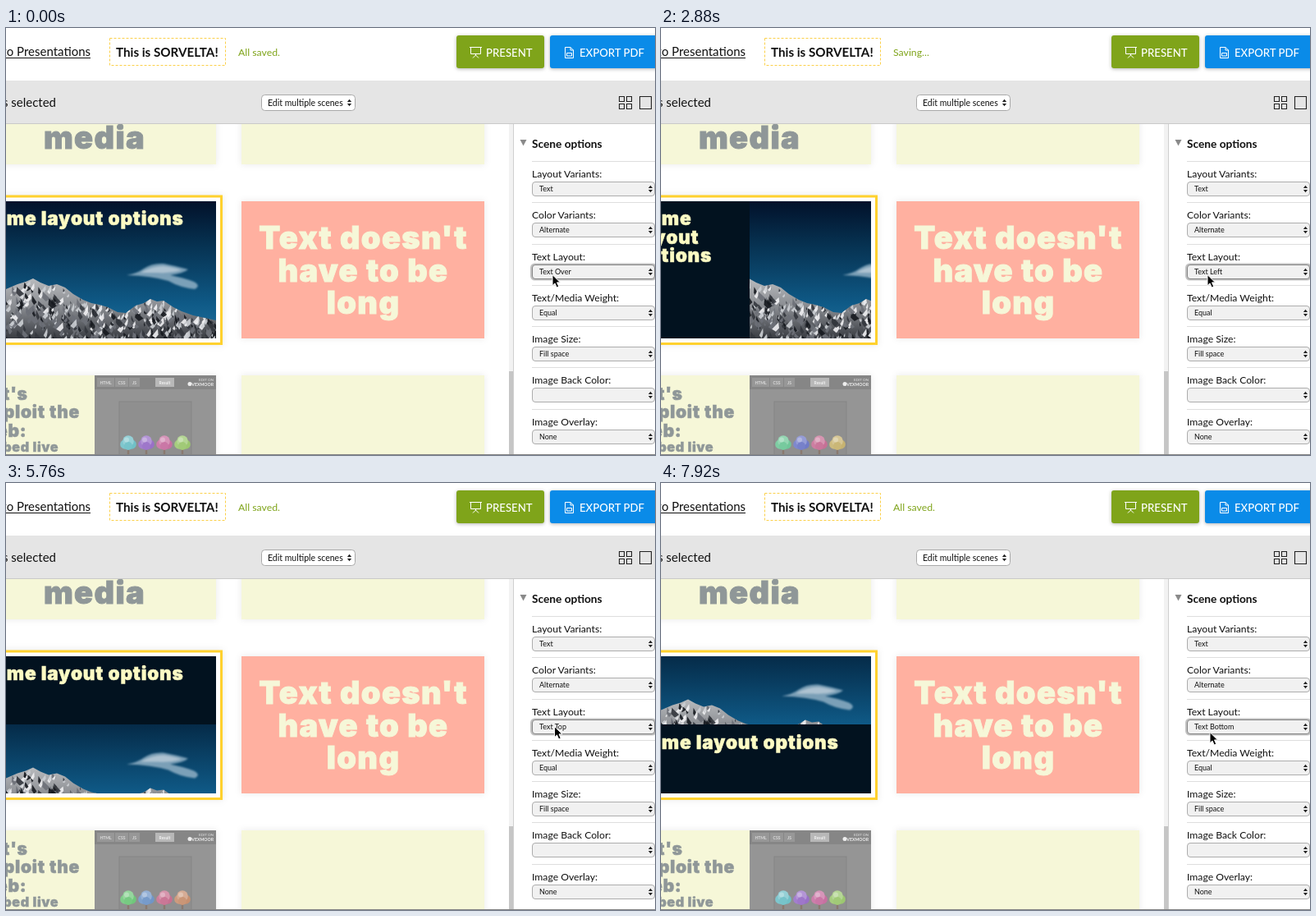
An HTML page for the animation above (8 s loop, 791 by 520 pixels).

```html
<!DOCTYPE html>
<html lang="en">
<head>
<meta charset="utf-8">
<title>Slide editor</title>
<style>
html, body { margin: 0; width: 100%; height: 100%; overflow: hidden; background: #fff; }
svg { display: block; width: 791px; height: 520px; }
text { font-family: Lato, "Open Sans", sans-serif; white-space: pre; }
.head { font-family: Inter, "Open Sans", sans-serif; font-weight: 900; letter-spacing: .036em; stroke-width: .024em; }
.menu text { font-family: Inter, Roboto, sans-serif; }
.card { filter: drop-shadow(0 0 4px rgba(0, 0, 0, .09)); }
.btn { filter: drop-shadow(0 1px 2px rgba(0, 0, 0, .3)); }
.menu rect.box { filter: drop-shadow(0 3px 5px rgba(0, 0, 0, .4)); }
</style>
</head>
<body>
<svg id="stage" viewBox="0 0 791 520">
  <defs>
    <linearGradient id="sky" x1="0" y1="0" x2="0" y2="1">
      <stop offset="0" stop-color="#02112a"/>
      <stop offset=".3" stop-color="#06304f"/>
      <stop offset=".75" stop-color="#0f5a87"/>
      <stop offset="1" stop-color="#22709c"/>
    </linearGradient>
    <linearGradient id="rock" gradientUnits="userSpaceOnUse" x1="0" y1="305" x2="0" y2="378">
      <stop offset="0" stop-color="#b9bbbe"/>
      <stop offset=".5" stop-color="#85888d"/>
      <stop offset="1" stop-color="#393c42"/>
    </linearGradient>
    <filter id="soft"><feGaussianBlur stdDeviation="1.3"/></filter>
    <clipPath id="crop"><rect id="cropBox"/></clipPath>
    <clipPath id="massif"><path id="massifShape"/></clipPath>
  </defs>
</svg>
<script>
const stage = document.getElementById('stage');
const $ = id => document.getElementById(id);
const LOOP = 8000;

const rect = (x, y, w, h, fill, more = '') =>
  `<rect x="${x}" y="${y}" width="${w}" height="${h}" fill="${fill}" ${more}/>`;
const text = (s, x, y, size, fill = '#111', more = '') =>
  `<text x="${x}" y="${y}" font-size="${size}" fill="${fill}" ${more}>${s}</text>`;
const head = (s, x, y, size, fill, more = '') =>
  text(s, x, y, size, fill, `class="head" stroke="${fill}" ${more}`);
const path = (d, fill, more = '') => `<path d="${d}" fill="${fill}" ${more}/>`;
const arrows = (x, y) => path(`M${x - 2.6} ${y - 1}h5.2l-2.6-3.2zM${x - 2.6} ${y + 1}h5.2l-2.6 3.2z`, '#222');

const CREAM = '#f6f7d8', GREY = '#8f9798', GREEN = '#7fa41a', NAVY = '#02121f', PALE = '#fdfbc4';
const MID = 'text-anchor="middle"', END = 'text-anchor="end"', BOLD = 'font-weight="700"';

function random(seed) {
  return () => (seed = seed * 16807 % 2147483647) / 2147483647;
}

// Mountain picture, drawn where it fills the whole slide
const RIDGE = [[-40, 335], [-15, 326], [0, 318], [14, 312], [24, 309], [33, 305], [42, 310], [52, 314],
  [62, 312], [72, 316], [82, 324], [94, 331], [104, 335], [114, 337], [124, 340], [136, 346], [146, 347],
  [158, 338], [168, 335], [176, 330], [184, 333], [192, 332], [204, 340], [214, 345], [228, 350], [256, 356]];
const MASSIF = 'M' + RIDGE.join('L') + 'V378H-40z';

function ridgeAt(x) {
  const i = Math.max(1, RIDGE.findIndex(p => p[0] >= x));
  const [x0, y0] = RIDGE[i - 1], [x1, y1] = RIDGE[i];
  return y0 + (y1 - y0) * (x - x0) / (x1 - x0);
}

// Snow lies on the left faces, shadow on the right ones
function mountains() {
  const rnd = random(77), tones = ['#f1f1f3', '#cdd0d4', '#6d7178', '#33373e', '#16191f'];
  let facets = '';
  for (let i = 0; i < 520; i++) {
    const x = -40 + rnd() * 296, top = ridgeAt(x), depth = rnd();
    const y = top - 2 + depth * (378 - top), s = 2 + rnd() * 5;
    const shade = rnd() < .36 + depth * .3, dx = (shade ? 1 : -1) * s * (.5 + rnd());
    const tone = tones[shade ? 2 + Math.floor(rnd() * 3) : Math.floor(rnd() * 2 + depth * .9)];
    facets += path(`M${x} ${y}l${dx} ${s * 1.3}l${-dx * .6} ${s * .5}l${-dx * .5} ${-s * .7}z`, tone, 'opacity=".9"');
  }
  return path(MASSIF, 'url(#rock)') + `<g clip-path="url(#massif)">${facets}</g>`;
}

const picture = rect(-40, 211, 296, 167, 'url(#sky)') +
  `<g filter="url(#soft)">` +
  path('M147 301Q160 299 168 293Q178 286 192 287Q208 290 222 294Q216 299 200 301Q216 304 229 309Q238 314 230 318Q212 316 198 308Q178 302 147 301z', '#8fafc5', 'opacity=".85"') +
  path('M164 298Q178 290 192 290Q206 292 214 295Q200 299 186 298z', '#c3d2dc', 'opacity=".7"') +
  `</g>` + mountains();

function slides() {
  const card = (x, y, w, h, fill) => rect(x, y, w, h, fill, 'class="card"');
  const line = (s, y) => head(s, 435.5, y, 38, CREAM, MID);
  const label = (s, x, w) => rect(x, 426, w, 11, '#979797') +
    text(s, x + w / 2, 433.5, 5, '#dcdcdc', MID + ' ' + BOLD);
  return card(-40, 60, 296, 106, CREAM) + card(287, 60, 296, 106, CREAM) +
    head('media', 108, 147, 38, GREY, MID) +
    rect(-48, 205, 310.5, 179.5, '#fff', 'stroke="#ffd12e" stroke-width="3" class="card"') +
    rect(-40, 211, 296, 167, NAVY) +
    `<g clip-path="url(#crop)"><g id="photo">${picture}</g></g><g id="caption"></g>` +
    card(287, 211, 296, 167, '#ffb0a0') +
    line("Text doesn't", 269) + line('have to be', 309) + line('long', 348) +
    card(-40, 423, 296, 120, CREAM) + card(287, 423, 296, 120, CREAM) +
    head("Let's", -30, 453, 21, GREY) + head('exploit the', -30, 475, 21, GREY) +
    head('web:', -30, 498, 21, GREY) + head('embed live', -30, 516, 16.2, GREY) +
    rect(108, 423, 148, 97, '#959595') + rect(108, 423, 148, 17, '#868686') +
    rect(138, 455, 88, 65, '#8f8f8f', 'stroke="#858585"') +
    label('HTML', 111, 21) + label('CSS', 133, 16) + label('JS', 150, 13) +
    rect(182, 426, 23, 11, '#b8b8b8') + text('Result', 193.5, 433.5, 5, '#f2f2f2', MID + ' ' + BOLD) +
    text('EDIT ON', 253, 430, 4.5, '#e4e4e4', END) +
    '<circle cx="224" cy="433.5" r="2.5" fill="#eee"/>' +
    text('VEXMOOR', 253, 436, 5.2, '#eee', END + ' ' + BOLD) +
    '<g id="trees"></g>' +
    rect(613, 117, 5, 403, '#f2f2f2') + rect(613, 418, 5, 102, '#c6c6c6');
}

function header() {
  const icon = d => path(d, 'none', 'stroke="#fff" stroke-width="1"');
  return rect(0, 0, 791, 64, '#fff') + rect(0, 64, 791, 52, '#e5e5e5') + rect(0, 116, 791, 1, '#c9c9c9') +
    text('Go to Presentations', 103, 34, 15, '#111', END) + rect(0, 36, 103, 1, '#111') +
    rect(126.5, 12.5, 141, 33, '#fff', 'stroke="#fbd04a" stroke-dasharray="3 2"') +
    text('This is SORVELTA!', 134, 34.5, 15.2, '#111', BOLD) +
    text('', 283, 34, 12.3, GREEN, 'id="status"') +
    rect(549, 9, 107, 40, GREEN, 'rx="3" class="btn"') + rect(663, 9, 140, 40, '#0a8be8', 'rx="3" class="btn"') +
    icon('M565 23.5h15M566.5 23.5v8h12v-8M572.5 31.5v2M569 36.5l3.5-3.5l3.5 3.5') +
    icon('M681.5 23.5h6.5l3.5 3.5v9.5h-10zM688 23.5v3.5h3.5M683.5 30.5h6v3.5h-6z') +
    text('PRESENT', 585, 35, 13.2, '#fff', 'font-weight="500"') +
    text('EXPORT PDF', 699, 35, 13.2, '#fff', 'font-weight="500"') +
    text('1 scenes selected', 61, 96, 15, '#111', END) +
    rect(311.5, 81.5, 114, 19, '#fff', 'rx="4" stroke="#a9a9a9"') +
    text('Edit multiple scenes', 319, 95, 10.5) + arrows(418.5, 91) +
    path('M747.5 83.5h6v6h-6zM756.5 83.5h6v6h-6zM747.5 92.5h6v6h-6zM756.5 92.5h6v6h-6zM772.5 83.5h14v15h-14z',
      'none', 'stroke="#222" stroke-width="1.1"');
}

function panel() {
  const fields = [['Layout Variants:', 'Text'], ['Color Variants:', 'Alternate'], ['Text Layout:', ''],
    ['Text/Media Weight:', 'Equal'], ['Image Size:', 'Fill space'], ['Image Back Color:', ''], ['Image Overlay:', 'None']];
  const rows = fields.map(([name, value], i) => {
    const y = Math.round(196 + 50.25 * i), focus = i === 2;
    return rect(641, y - 34, 150, 1, '#dedede') + text(name, 641, y - 14, 12.2) +
      (focus ? rect(640.5, y - 9, 151, 18, 'none', 'rx="4" stroke="#9a9a9a" stroke-width="3" opacity=".6"') : '') +
      rect(641.5, y - 8.5, 149, 17, '#f1f1f1', `rx="3.5" stroke="${focus ? '#858585' : '#adadad'}"`) +
      text(value, 650, y + 3.2, 9, '#111', focus ? 'id="choice"' : '') + arrows(785.5, y);
  });
  return rect(618, 117, 173, 403, '#fff') + rect(618, 117, 1, 403, '#cfcfcf') +
    path('M626.5 136h8l-4 7.5z', '#8a8a8a') + text('Scene options', 641, 145.5, 13.7, '#111', BOLD) + rows.join('');
}

stage.innerHTML += slides() + header() + panel() + rect(0, 519, 791, 1, '#858585') +
  '<g id="menu" class="menu"></g>' +
  `<g id="cursor">${path('M0 0V13.2L3 10.4L5.2 15.4L7.7 14.3L5.5 9.4H9.5z', '#000', 'stroke="#fff" stroke-width="1"')}</g>`;
$('massifShape').setAttribute('d', MASSIF);

const NAMES = ['Text Over', 'Text Left', 'Text Right', 'Text Top', 'Text Bottom'];
// Visible part of the picture, its shift, and the caption's place
const LAYOUTS = [
  { box: [-40, 211, 296, 167], shift: [0, 0], at: [-30, 240] },
  { box: [108, 211, 148, 167], shift: [74, 0], at: [-30, 240], narrow: true },
  { box: [-40, 211, 148, 167], shift: [-74, 0], at: [118, 240], narrow: true },
  { box: [-40, 294, 296, 84], shift: [0, 41.5], at: [-30, 240] },
  { box: [-40, 211, 296, 83], shift: [0, -41.5], at: [-30, 323.5] }
];
const PICKS = [1240, 2960, 4740, 6900];
const MENUS = [[480, 1000], [2100, 2720], [3700, 4500], [6100, 6660]];
const SAVED = 'All saved.', WAIT = 'Waiting for saving...', SAVE = 'Saving...';
const STATUS = [[0, SAVED], [1320, WAIT], [2720, SAVE], [3040, WAIT], [4400, SAVE], [5000, SAVED],
  [5840, WAIT], [6400, SAVE], [6960, WAIT], [7360, SAVE], [7760, SAVED]];
const PATH = [[0, 666, 300.5], [5000, 666, 300.5], [5400, 668.5, 296.5], [6000, 668.5, 296.5],
  [6200, 669, 303.5], [LOOP, 669, 303.5]];

const ease = u => u * u * (3 - 2 * u);

function showLayout(k) {
  const { box, shift, at: [x, y], narrow } = LAYOUTS[k];
  ['x', 'y', 'width', 'height'].forEach((name, i) => $('cropBox').setAttribute(name, box[i]));
  $('photo').setAttribute('transform', `translate(${shift})`);
  const lines = narrow ? ['Some', 'layout', 'options'] : ['Some layout options'];
  $('caption').innerHTML = lines.map((s, i) => head(s, x, y + i * 22.7, 22.6, PALE)).join('');
  $('choice').textContent = NAMES[k];
}

function buildMenu(k) {
  const top = 284.6 - 12.3 * k, row = i => top + 10.4 + 12.3 * i;
  $('menu').innerHTML = rect(631.5, top, 151, 69, '#ececec', 'rx="4" class="box" stroke="#c4c4c4" stroke-width=".6"') +
    rect(631.5, row(k + 1) - 6.1, 151, 12.3, '#a5a5a5') +
    path(`M637.5 ${row(k) + .5}l2.4 3l4.2-7`, 'none', 'stroke="#333" stroke-width="1.3"') +
    NAMES.map((s, i) => text(s, 652, row(i) + 3, 8.5, i === k + 1 ? '#fff' : '#333')).join('');
}

function drawTrees(t) {
  const m = Math.min(1, Math.max(0, .5 - .8 * Math.cos(t / 4000 * 2 * Math.PI)));
  const from = [185, 268, 326, 90], to = [128, 214, 338, 22];
  $('trees').innerHTML = from.map((h, i) => {
    const x = 149 + 22 * i, hue = h + (to[i] - h) * m;
    const blob = (dx, y, r, l) => `<circle cx="${x + dx}" cy="${y}" r="${r}" fill="hsl(${hue} 44% ${l}%)"/>`;
    return rect(x - 1.2, 508, 2.4, 11, '#8a7a70') + blob(-4, 507, 5.8, 65) + blob(4, 507, 5.8, 61) +
      blob(0, 503, 6.8, 71) + blob(0, 509, 5, 63) + blob(-2, 501.5, 3, 79);
  }).join('');
}

let layout = -1, menu = -1;

function draw(t) {
  const k = PICKS.filter(p => t >= p).length;
  if (k !== layout) showLayout(layout = k);

  const open = MENUS.findIndex(([a, b]) => t >= a && t < b + 160);
  if (open !== menu) {
    menu = open;
    if (open < 0) $('menu').innerHTML = '';
    else buildMenu(open);
  }
  if (open >= 0) $('menu').setAttribute('opacity', Math.min(1, 1 - (t - MENUS[open][1]) / 160));

  $('status').textContent = STATUS.filter(s => t >= s[0]).pop()[1];

  const i = PATH.findIndex(p => p[0] > t), [t0, x0, y0] = PATH[i - 1], [t1, x1, y1] = PATH[i];
  const u = ease((t - t0) / (t1 - t0));
  $('cursor').setAttribute('transform', `translate(${x0 + (x1 - x0) * u} ${y0 + (y1 - y0) * u})`);
  drawTrees(t);
}

function tick() {
  draw(performance.now() % LOOP);
  requestAnimationFrame(tick);
}
tick();
</script>
</body>
</html>
```
